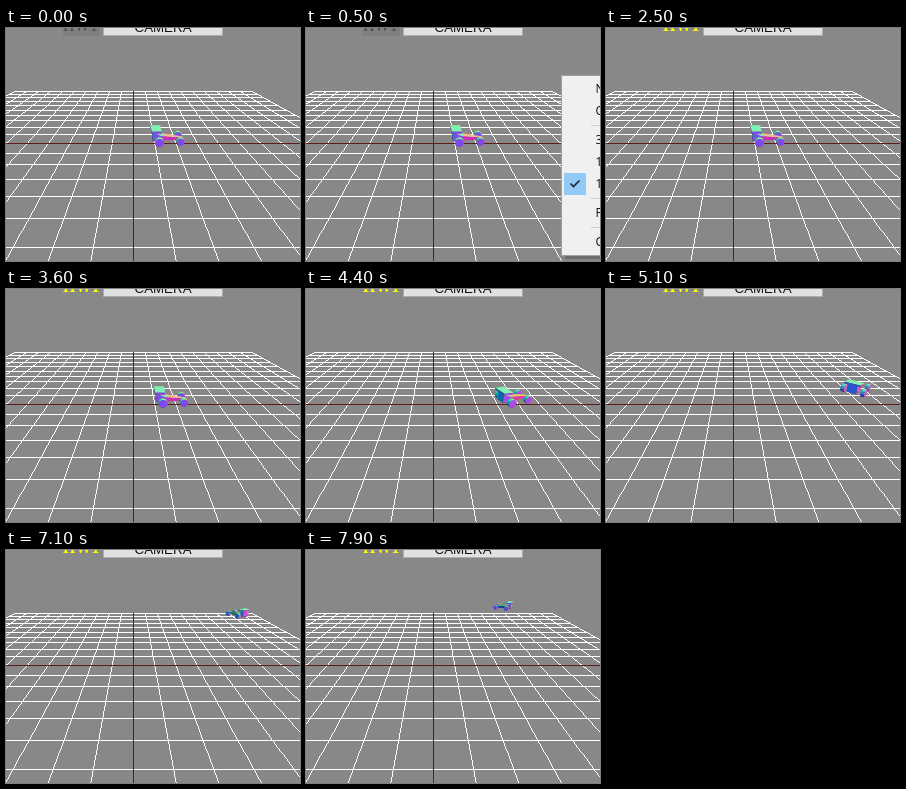
Write an HTML page with a canvas that moves like this. It is 294 px wide and 233 px high and loops after 8 s.

```html
<!DOCTYPE html>
<html>
<head>
<meta charset="utf-8">
<style>
  html, body { margin: 0; width: 100%; height: 100%; overflow: hidden; background: #888; }
  canvas { display: block; }
</style>
</head>
<body>
<canvas width="294" height="233"></canvas>
<script>
const ctx = document.querySelector('canvas').getContext('2d');
const WIDTH = 294, HEIGHT = 233, LOOP = 8, STEP = 0.1;

// Camera: tilted down, looking at the middle of the grid.
const SIN = 0.433, COS = 0.901, DISTANCE = 11.5, FOCAL = 244;

// The drive: speed up on the straight, then hold a steady left turn (units, seconds, radians).
const START_X = 1.6, START_Z = -0.2, TOP_SPEED = 4.2;
const GO_TIME = 3.3, RAMP = 1.15, TURN_TIME = 4.1, TURN_RATE = 0.663, LEAD = 0.2;

const clamp = v => Math.min(1, Math.max(0, v));
const heading = t => Math.max(0, t - TURN_TIME) * TURN_RATE;
const speed = t => TOP_SPEED * clamp((t - GO_TIME) / RAMP);

function position(t) {
  const dt = 0.02;
  let x = START_X, z = START_Z;
  for (let s = GO_TIME + dt / 2; s < t; s += dt) {
    x += speed(s) * Math.cos(heading(s)) * dt;
    z -= speed(s) * Math.sin(heading(s)) * dt;
  }
  return [x, z];
}

function project([x, y, z]) {
  const depth = DISTANCE - z * COS - y * SIN;
  return [127.5 + FOCAL * x / depth, 115.1 - FOCAL * (y * COS - z * SIN) / depth, depth];
}

function rect(color, x, y, w, h) {
  ctx.fillStyle = color;
  ctx.fillRect(x, y, w, h);
}

function text(string, x, y, font, color) {
  ctx.font = font;
  ctx.fillStyle = color;
  ctx.fillText(string, x, y);
}

// Hard-edged line, one pixel wide.
function crispLine(color, [x1, y1], [x2, y2]) {
  const dx = x2 - x1, dy = y2 - y1, n = Math.ceil(Math.max(Math.abs(dx), Math.abs(dy)));
  for (let i = 0; i <= n; i++)
    rect(color, Math.floor(x1 + dx * i / n), Math.floor(y1 + dy * i / n), 1, 1);
}

function gridLines(i, color) {
  crispLine(color, project([i, 0, -10]), project([i, 0, 6.8]));
  if (i < 7) crispLine(color, project([-10, 0, i]), project([10, 0, i]));
}

function drawGrid() {
  for (let i = -10; i <= 10; i++) if (i) gridLines(i, '#fff');
  gridLines(0, '#5c1c1c');
}

// Faces are { points, normal } in car space: forward, left, up.
function box(f0, f1, side, u0, u1, noseSide = side, noseTop = u1) {
  const point = (f, l, u) => [f > 0 ? f1 : f0, l * (f > 0 ? noseSide : side), u < 0 ? u0 : f > 0 ? noseTop : u1];
  const faces = [];
  for (let axis = 0; axis < 3; axis++)
    for (const sign of [-1, 1]) {
      const corner = (a, b) => {
        const c = [];
        c[axis] = sign;
        c[(axis + 1) % 3] = a;
        c[(axis + 2) % 3] = b;
        return point(...c);
      };
      const normal = [0, 0, 0];
      normal[axis] = sign;
      faces.push({ normal, points: [corner(-1, -1), corner(1, -1), corner(1, 1), corner(-1, 1)] });
    }
  return faces;
}

function wheel(f, l, radius, halfWidth) {
  const n = 10, faces = [];
  const rim = (i, side) => {
    const a = i / n * 2 * Math.PI;
    return [f + radius * Math.cos(a), l + side * halfWidth, radius + radius * Math.sin(a)];
  };
  for (const side of [-1, 1])
    faces.push({ normal: [0, side, 0], points: Array.from({ length: n }, (_, i) => rim(i, side)) });
  for (let i = 0; i < n; i++) {
    const a = (i + 0.5) / n * 2 * Math.PI;
    faces.push({
      normal: [Math.cos(a), 0, Math.sin(a)],
      points: [rim(i, -1), rim(i + 1, -1), rim(i + 1, 1), rim(i, 1)]
    });
  }
  return faces;
}

// The nose is shaded as if its faces leaned forward and down.
const nose = box(-0.5, 0.74, 0.22, 0.14, 0.38, 0.08, 0.22).map(({ points, normal: [f, l, u] }) =>
  ({ points, normal: [f + 0.8, l, u - 0.5] }));
const engine = box(-0.7, -0.2, 0.24, 0.14, 0.56, 0.2, 0.32);
const wing = box(-0.78, -0.32, 0.4, 0.58, 0.66);
const wheels = [-1, 1].flatMap(side => [
  ...wheel(-0.42, side * 0.5, 0.2, 0.09),
  ...wheel(0.56, side * 0.38, 0.18, 0.09)
]);
const car = [...nose, ...engine, ...wing, ...wheels];

function drawCar(t) {
  const [x, z] = position(t);
  const yaw = heading(t + LEAD), c = Math.cos(yaw), s = Math.sin(yaw);
  const turn = ([f, l, u]) => [f * c - l * s, u, -f * s - l * c];

  // Colour shows the direction a face points in, as seen from the camera.
  const shade = normal => {
    const [nx, ny, nz] = turn(normal), size = Math.hypot(nx, ny, nz);
    const view = [nx, ny * COS - nz * SIN, ny * SIN + nz * COS];
    return `rgb(${view.map(v => Math.round(127.5 + 127.5 * v / size))})`;
  };

  const faces = car.map(({ points, normal }) => {
    const corners = points.map(p => {
      const [px, py, pz] = turn(p);
      return project([x + px, py, z + pz]);
    });
    const depth = corners.reduce((sum, p) => sum + p[2], 0) / corners.length;
    return { corners, depth, color: shade(normal) };
  });

  for (const { corners, color } of faces.sort((a, b) => b.depth - a.depth)) {
    ctx.fillStyle = color;
    ctx.beginPath();
    corners.forEach(p => ctx.lineTo(p[0], p[1]));
    ctx.fill();
  }
}

function drawHeader(active) {
  const serif = '16px "Liberation Serif", serif';
  if (!active) rect('#7f7f7f', 57, 0, 37, 8);
  text('HW1', 57, 3, active ? 'bold ' + serif : serif, active ? '#ff0' : '#484848');
  rect('#adadad', 97, 0, 120, 8);
  rect('#e1e1e1', 98, 0, 118, 7);
  text('CAMERA', 128.5, 4, '13.33px "Liberation Sans", Arial, sans-serif', '#111');
}

function drawMenu(t) {
  ctx.save();
  ctx.globalAlpha = clamp((t - 0.1) / 0.3);
  rect('rgba(0,0,0,.2)', 259, 51, 40, 180);
  rect('#a0a0a0', 255, 47, 40, 181);
  rect('#f0f0f0', 256, 48, 40, 179);

  let y = 50;
  for (const group of ['NO', '311', 'F', 'C']) {
    if (y > 50) {
      rect('#d0d0d0', 285, y + 3, 10, 1);
      y += 7;
    }
    for (const label of group) {
      if (label === 'F' && t > 0.75 && t < 1.15) rect('#91c9f7', 258, y, 40, 22);
      text(label, 289.5, y + 15, '12px "Open Sans", sans-serif', '#111');
      y += 22;
    }
  }

  rect('#91c9f7', 258, 145, 22, 22);
  ctx.lineWidth = 1.6;
  ctx.strokeStyle = '#223';
  ctx.stroke(new Path2D('M264.5 155.5l3 3 6-6'));
  ctx.restore();
}

function draw() {
  const t = Math.floor(performance.now() / 1000 % LOOP / STEP + 1e-6) * STEP;
  rect('#888', 0, 0, WIDTH, HEIGHT);
  drawGrid();
  drawCar(t);
  const menuClosed = t > 2.35;
  drawHeader(menuClosed);
  if (!menuClosed) drawMenu(t);
  requestAnimationFrame(draw);
}
draw();
</script>
</body>
</html>
```
